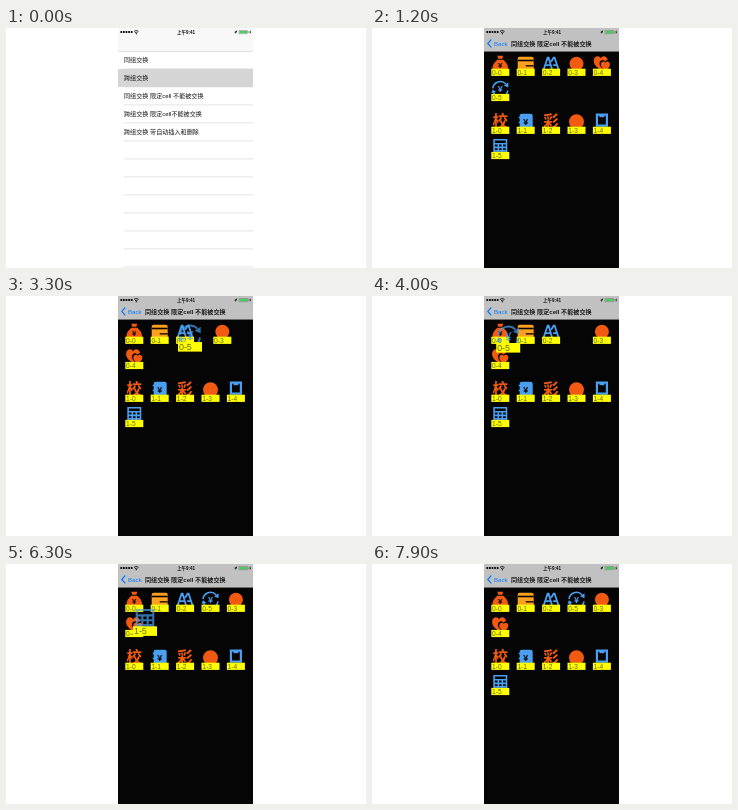
Animation, 360 px wide and 240 px high, one loop 8000 ms. Source, as an HTML page with a canvas:

```html
<!DOCTYPE html>
<html lang="zh">
<head>
<meta charset="utf-8">
<style>
html, body { margin: 0; width: 100%; height: 100%; overflow: hidden; background: #fff; }
canvas { display: block; width: 360px; height: 240px; }
</style>
</head>
<body>
<canvas></canvas>
<script>
const LOOP = 8000, LEFT = 112, WIDTH = 135;
const ORANGE = '#f25a12', AMBER = '#ffa11f', BLUE = '#4a9ff0', BLACK = '#050505';
const FONT = '"Liberation Sans", "Noto Sans CJK SC", "Noto Sans CJK JP", sans-serif';
const ROWS = ['同组交换', '跨组交换', '同组交换 限定cell 不能被交换',
  '跨组交换 限定cell不能被交换', '跨组交换 带自动插入和删除'];

const canvas = document.querySelector('canvas');
const c = canvas.getContext('2d');
const ratio = window.devicePixelRatio || 1;
canvas.width = 360 * ratio;
canvas.height = 240 * ratio;

const clamp = v => Math.max(0, Math.min(1, v));
const mix = (a, b, k) => a + (b - a) * k;
const ease = k => { k = clamp(k); return k * k * (3 - 2 * k); };

function box(x, y, w, h, color) {
  c.fillStyle = color;
  c.fillRect(x, y, w, h);
}
function disc(x, y, r, color) {
  c.fillStyle = color;
  c.beginPath();
  c.arc(x, y, r, 0, 7);
  c.fill();
}
function shape(d, color) {
  c.fillStyle = color;
  c.fill(new Path2D(d));
}
function line(d, color, width) {
  c.strokeStyle = color;
  c.lineWidth = width;
  c.stroke(new Path2D(d));
}
function text(s, x, y, size, color, weight = 400, align = 'left') {
  c.font = `${weight} ${size}px ${FONT}`;
  c.textAlign = align;
  c.textBaseline = 'alphabetic';
  c.fillStyle = color;
  c.fillText(s, x, y);
}
const yen = (size, y, color) => text('¥', 0, y, size, color, 700, 'center');
const glyph = s => text(s, 0, 3.2, 15.5, ORANGE, 700, 'center');

function heart(x, y, size, color) {
  c.save();
  c.translate(x, y);
  c.scale(size, size);
  shape('M0 7C-5 4-7 1-7-2C-7-7-1.5-8 0-4.5C1.5-8 7-7 7-2C7 1 5 4 0 7Z', color);
  c.restore();
}

// Icons are drawn around the middle of an 18 by 20 cell.
const ICONS = {
  '0-0'() {
    shape('M-3-10H3L2-7H-2Z M-3-6H3C9-1 9 5 5 5H-5C-9 5-9-1-3-6Z', ORANGE);
    yen(8, 2.3, BLACK);
  },
  '0-1'() {
    shape('M-6-9H6Q8-9 8-7V4H-8V-7Q-8-9-6-9Z', AMBER);
    box(-8, -6, 16, 1.6, BLACK);
    box(0, -.5, 8, 1.3, BLACK);
  },
  '0-2'() {
    line('M-7.5 4L-3.5-8H-2.5L1 4 M-6-.5H-1 M0-4L2.5-8H3.5L7.5 4 M2-.5H6', BLUE, 1.8);
  },
  '0-3'() { disc(0, -2, 7, ORANGE); },
  '0-4'() {
    heart(-1.2, -3, 1, ORANGE);
    heart(3.2, -.5, .8, BLACK);
    heart(3.5, 0, .65, ORANGE);
  },
  '0-5'() {
    line('M-7.5-2.5A7.6 7.6 0 0 1 5.5-7 M7.5-.5A7.6 7.6 0 0 1 5.5 4 M-7 1L-5.5 4', BLUE, 1.5);
    shape('M3.5-5.5L8-8.5L8-3.5Z M-9 2L-7.5-1.5L-4 1Z', BLUE);
    yen(9, 1.4, BLUE);
  },
  '1-0'() { glyph('校'); },
  '1-1'() {
    shape('M-4-10H5Q7-10 7-8V4H-6V-8Q-6-10-4-10Z', BLUE);
    box(-7, -7, 2, 1.5, BLUE);
    box(-7, -2, 2, 1.5, BLUE);
    yen(9, 1, BLACK);
  },
  '1-2'() { glyph('彩'); },
  '1-3'() { disc(0, -2, 7.5, ORANGE); },
  '1-4'() {
    line('M-5-9H5V2H-5Z', BLUE, 2.2);
    box(-2.5, -9, 5, 2.5, BLUE);
  },
  '1-5'() {
    line('M-6.2-9.2H6.2V4H-6.2Z M-6-5.2H6 M-2-5V4 M2-5V4 M-6-1.5H6 M-6 2H6', BLUE, 1.6);
  }
};

function cell(id, [x, y], scale = 1, alpha = 1) {
  c.save();
  c.translate(x, y);
  c.scale(scale, scale);
  c.globalAlpha = alpha;
  ICONS[id]();
  c.globalAlpha = 1;
  box(-9, 3, 18, 7.2, '#ff0');
  text(id, -8.3, 8.8, 6.7, '#66661c');
  c.restore();
}

const slot = (section, i) => [128.3 + 25.4 * (i % 5), 37.7 + 25.2 * Math.floor(i / 5) + 58 * section];

// Moves between [time, x, y] points.
function along(path, t) {
  let i = 1;
  while (i < path.length - 1 && t > path[i][0]) i++;
  const [a, b] = [path[i - 1], path[i]];
  const k = ease((t - a[0]) / (b[0] - a[0]));
  return [mix(a[1], b[1], k), mix(a[2], b[2], k)];
}

const DRAGS = [
  { id: '0-5', start: 2000, drop: 4450, end: 4950, path: [
    [2000, ...slot(0, 5)], [2400, 141.5, 43.3], [2900, 229, 42], [3050, 229, 42],
    [3300, 184, 42], [3700, 154, 43], [4100, 133, 43], [4450, 179, 43], [4750, ...slot(0, 3)]] },
  { id: '1-5', start: 5400, drop: 7350, end: 7850, path: [
    [5400, ...slot(1, 5)], [5800, 130, 88], [6300, 139, 58.3], [6700, 180, 48],
    [7000, 205, 50], [7350, 160, 72], [7650, ...slot(1, 5)]] }
];

function drawCells(t) {
  const drag = DRAGS.find(d => t >= d.start && t < d.end);
  const places = {};
  for (let i = 0; i < 6; i++) {
    places['0-' + i] = slot(0, i);
    places['1-' + i] = slot(1, i);
  }
  places['0-3'] = along([[3165, ...slot(0, 3)], [3450, ...slot(0, 4)]], t);
  places['0-4'] = along([[2850, ...slot(0, 4)], [3100, ...slot(0, 5)]], t);
  if (t > 3200) places['0-5'] = slot(0, 3);
  for (const id in places)
    if (!drag || id !== drag.id) cell(id, places[id]);
  if (drag) {
    const lift = ease((t - drag.start) / 200) * (1 - ease((t - drag.drop) / 260));
    cell(drag.id, along(drag.path, t), 1 + lift / 3, .7);
  }
}

function drawList(t, shift) {
  c.save();
  c.translate(-shift, 0);
  box(LEFT, 0, WIDTH + 45, 240, '#fff');
  for (let i = 1; i <= 12; i++) box(118, 22.7 + 18 * i, 129, .5, '#c8c7cc');
  box(LEFT, t < 400 ? 41 : 59, WIDTH, 18, '#d5d5d5');
  ROWS.forEach((s, i) => text(s, 118, 34.3 + 18 * i, 6.1, '#111'));
  c.restore();
}

function drawStatus() {
  for (let i = 0; i < 5; i++) disc(115.3 + 2.6 * i, 4, 1.1, '#000');
  line('M128 3.4Q130.3 1.4 132.6 3.4 M129 4.7Q130.3 3.6 131.6 4.7', '#000', .8);
  disc(130.3, 5.7, .6, '#000');
  text('上午9:41', 180, 5.7, 4.5, '#111', 700, 'center');
  shape('M228 4.2L231.3 2.3L229.8 6L229.5 4.4Z', '#000');
  line('M233 2.5H241.5V5.7H233Z', '#555', .4);
  box(233.5, 3, 7.5, 2.2, '#3fd158');
  box(242, 3.5, .6, 1.2, '#555');
  shape('M244.6 2L243.2 4.3H244.1L243.6 6.2L245.2 3.7H244.2Z', '#000');
}

// Translucent bar that blurs the edge of the page below it
function drawBar(push, off) {
  const edge = LEFT + off, blur = 14;
  const shade = c.createLinearGradient(edge - blur, 0, edge + blur, 0);
  shade.addColorStop(0, '#fff');
  shade.addColorStop(1, BLACK);
  box(LEFT, 0, WIDTH, 23.3, push === 1 ? BLACK : push ? shade : '#fff');
  box(LEFT, 0, WIDTH, 23.3, 'rgba(247,247,247,.78)');
  box(LEFT, 23, WIDTH, .4, '#b5b5b5');

  const shown = clamp((push - .9) * 10);
  const tint = `rgb(${mix(130, 0, shown)},${mix(140, 122, shown)},${mix(150, 255, shown)})`;
  c.globalAlpha = shown;
  line('M119.3 11.5L115.8 15.4L119.3 19.3', tint, 1.2);
  text('Back', 122 + off * .2, 17.5, 6.1, tint);
  c.globalAlpha = push;
  text(ROWS[2], 139 + off * .75, 17.5, 6.1, '#1a1a1a', 700);
  c.globalAlpha = 1;
}

function draw(t) {
  const w = Math.max(0, t - 455) * .01826;
  const push = t > 1200 ? 1 : 1 - (1 + w) * Math.exp(-w);
  const off = WIDTH * (1 - push);
  c.setTransform(ratio, 0, 0, ratio, 0, 0);
  box(0, 0, 360, 240, '#fff');
  c.save();
  c.beginPath();
  c.rect(LEFT, 0, WIDTH, 240);
  c.clip();
  if (push < 1) {
    drawList(t, WIDTH * .3 * push);
    box(LEFT, 0, WIDTH, 240, `rgba(0,0,0,${.1 * push})`);
  }
  if (push > 0) {
    c.save();
    c.translate(off, 0);
    box(LEFT, 0, WIDTH, 240, BLACK);
    drawCells(t);
    c.restore();
  }
  drawBar(push, off);
  drawStatus();
  c.restore();
}

const begin = performance.now();
function tick() {
  draw((performance.now() - begin) % LOOP);
  requestAnimationFrame(tick);
}
tick();
</script>
</body>
</html>
```
